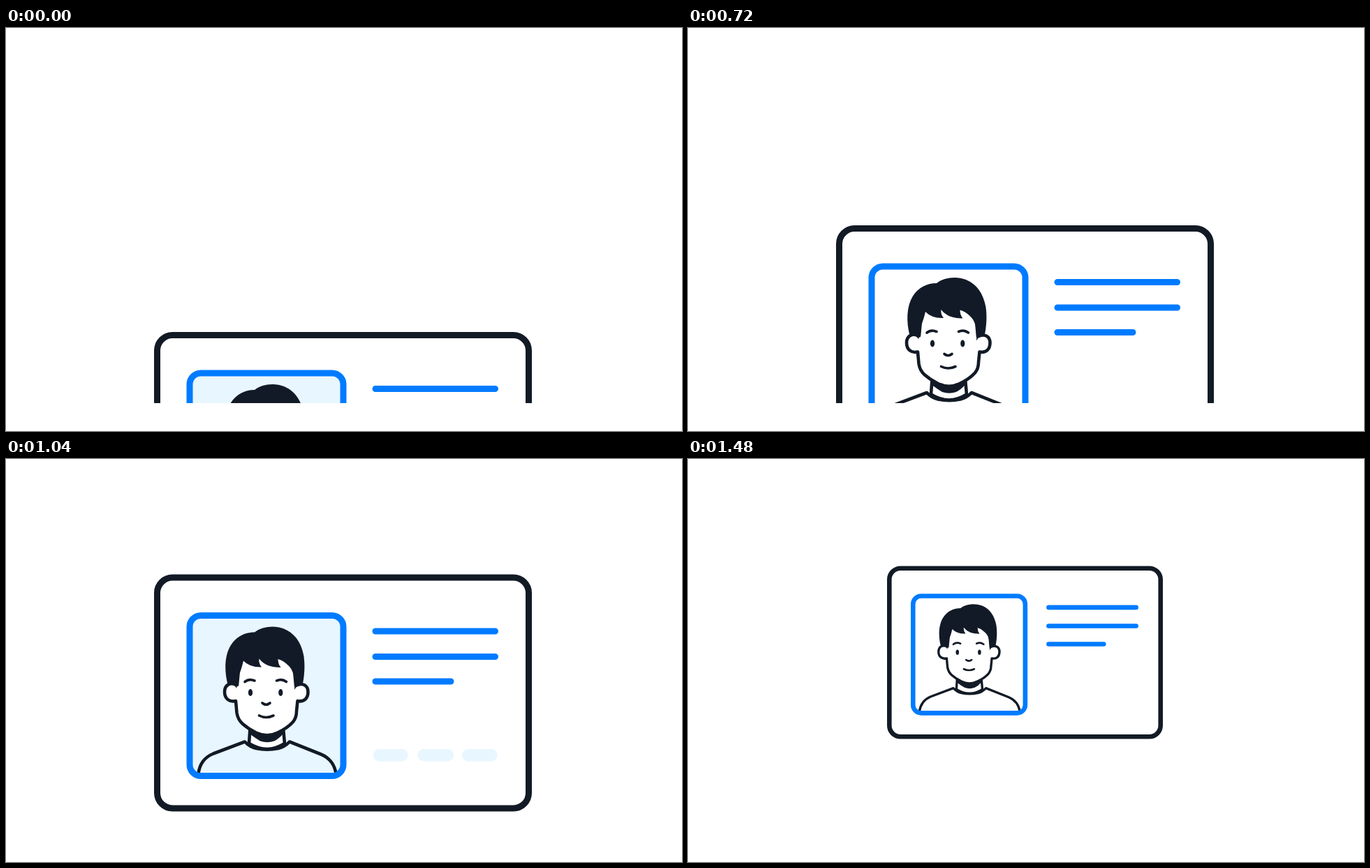
An HTML page that plays this animation: 968x578 px, repeating every 2 s.

```html
<!DOCTYPE html>
<html lang="en">
<head>
<meta charset="utf-8">
<title>ID card</title>
<style>
  html, body { margin: 0; width: 100%; height: 100%; overflow: hidden; background: #fff; }
  svg { display: block; width: 968px; height: 578px; }
  .ink { stroke: #121a25; fill: none; }
  .blue { stroke: #007bff; fill: none; }
  .solid { fill: #121a28; }
  .skin { fill: #fff; }
  .tint { fill: #e8f6ff; }
  .plain .tint { fill: #fff; }
</style>
</head>
<body>
<svg viewBox="0 0 968 578" stroke-linecap="round" stroke-linejoin="round">
  <clipPath id="slot"><rect width="968" height="538"/></clipPath>
  <clipPath id="photo"><rect x="263" y="224.5" width="220" height="227" rx="16"/></clipPath>
  <g clip-path="url(#slot)">
    <g id="card">
      <rect class="ink" x="216.5" y="170" width="532" height="331" rx="22" stroke-width="9"/>
      <rect class="tint" x="263" y="224.5" width="220" height="230" rx="16"/>

      <g clip-path="url(#photo)" stroke-width="4.6">
        <path class="ink skin" d="M349.500 386L348 408Q374 424 399 408L397 386Z"/>
        <path class="ink tint" d="M275 454C277 437 284 428 297 422.500L342 405.500Q349 413 358 415Q374 418.500 390 415Q399 413 406 405.500L451 423.500C464 429 471 438 473 454"/>
        <path class="solid" d="M349 386L350 395Q358 401 364 404.500Q374 408 384 404.500Q391 401 397 394L398 385Z"/>
        <path class="ink skin" d="M331 324C320 319 313 325 313 334C313 344 320 349 329 347L330.500 364Q332 374 339 380Q347 387 358 392.500Q374 400 389 392.500Q403 386 411 377Q416 371 416 362L417.500 347C427 349 432.500 343 432.500 334C432.500 325 425 320 415 325L411 280H335Z"/>
        <path class="solid" d="M318 325C312 304 313 281 322 267C330 254 343 248.500 356 248.500C366 240.500 384 238 398 243.500C414 250 423 264 426.500 283C428.500 298 427 312 425 322Q418 322 413 331C414 315 412 302 403 295Q397 289 389.500 287Q389.500 294 393.500 299Q372 299 362.500 286.500Q361.500 293 366 298.500Q349 299 340 289.500Q337 302 333.500 310Q330 317 330.500 329Q325 321 318 325Z"/>
        <g class="solid">
          <ellipse cx="350" cy="335" rx="3.1" ry="5"/>
          <ellipse cx="393.300" cy="335" rx="3.1" ry="5"/>
        </g>
        <path class="ink" stroke-width="3.6" d="M342 319.500Q348 314.500 356 318M387.500 318Q395 314.500 401.500 319.500M367 350Q372.500 354.500 378 350M362.500 368Q372.500 373 383 368"/>
      </g>

      <rect class="blue" x="263" y="224.5" width="220" height="230" rx="16" stroke-width="9"/>
      <path class="blue" stroke-width="9" d="M529 247H700.500M529 283.500H700.500M529 319H637"/>
      <g class="tint">
        <rect x="526" y="416" width="49.5" height="17.500" rx="8.500"/>
        <rect x="589.500" y="416" width="51.500" height="17.500" rx="8.500"/>
        <rect x="653" y="416" width="50.500" height="17.500" rx="8.500"/>
      </g>
    </g>
  </g>
</svg>
<script>
const LOOP = 2000, STEP = 40;
const card = document.getElementById('card');

// [ms, centre y, speed in px/ms]
const rise = [
  [480, 606, -0.85], [720, 453, -0.47], [880, 391, -0.375], [1000, 347, -0.33],
  [1040, 335.5, -0.27], [1320, 289, -0.1], [1480, 277.5, -0.05]
];

function centreY(t) {
  const i = rise.findIndex(k => k[0] > t);
  if (i === 0) return rise[0][1];
  if (i < 0) return rise[rise.length - 1][1];
  const [t0, y0, v0] = rise[i - 1], [t1, y1, v1] = rise[i];
  const h = t1 - t0, u = (t - t0) / h, w = 1 - u;
  return w * w * ((1 + 2 * u) * y0 + u * h * v0)
       + u * u * ((1 + 2 * w) * y1 - w * h * v1);
}

function scale(t) {
  const u = Math.min(Math.max((t - 1100) / 380, 0), 1);
  return 1 - 0.27 * u * u;
}

const tinted = t => t < 600 || (t >= 960 && t < 1160);

function draw(now) {
  const t = Math.floor((now % LOOP + 0.5) / STEP) * STEP % LOOP;
  card.setAttribute('transform',
    `translate(482.5 ${centreY(t)}) scale(${scale(t)}) translate(-482.5 -335.5)`);
  card.classList.toggle('plain', !tinted(t));
}

function tick() {
  draw(performance.now());
  requestAnimationFrame(tick);
}
tick();
</script>
</body>
</html>
```
